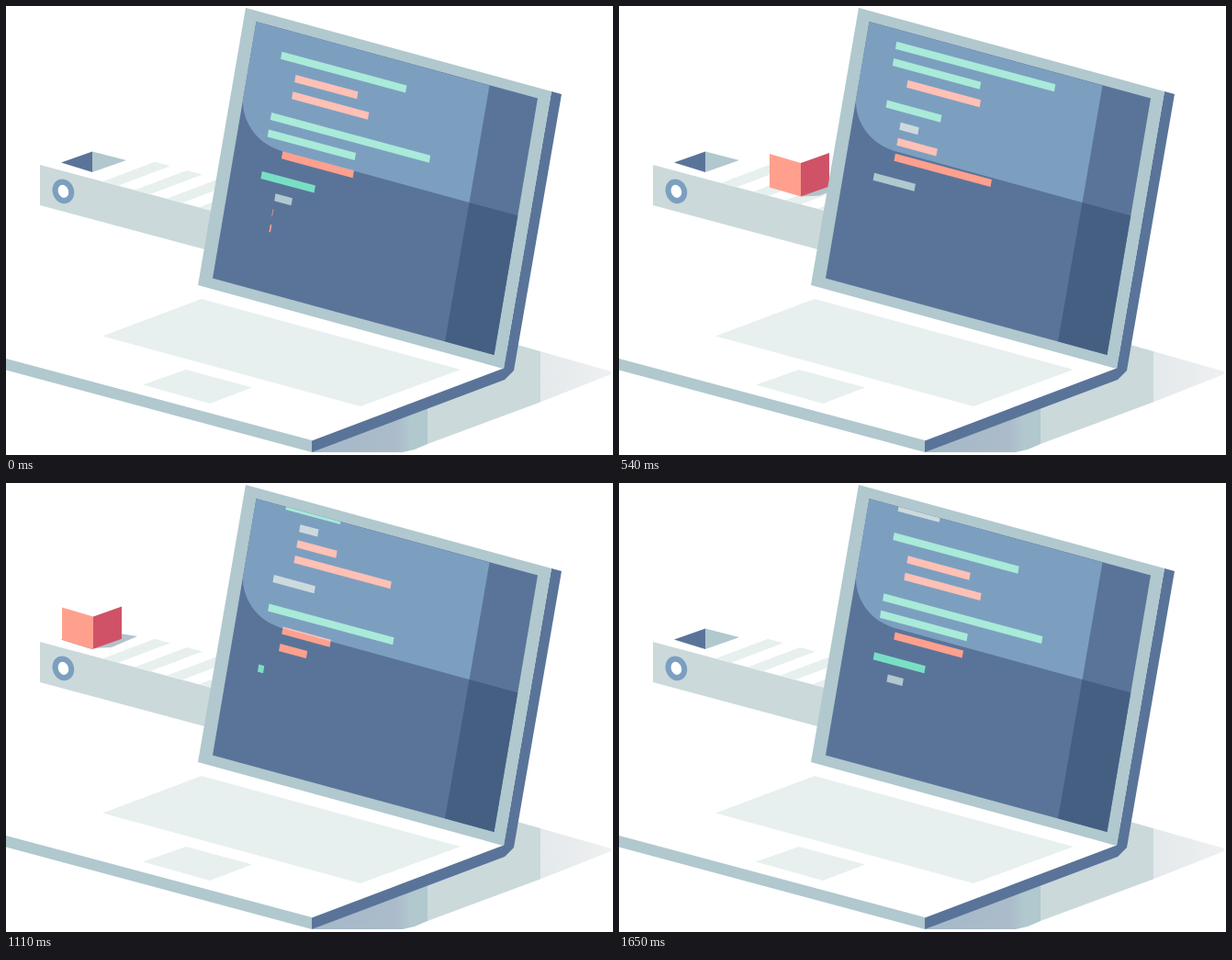
Recreate the animation shown at these times as an HTML page with a canvas. Size 661 by 489 pixels, loop 1680 ms.

```html
<!DOCTYPE html>
<html lang="en">
<head>
<meta charset="utf-8">
<title>Laptop and conveyor</title>
<style>
html, body { margin: 0; width: 100%; height: 100%; overflow: hidden; background: #fff; }
canvas { display: block; }
</style>
</head>
<body>
<canvas id="stage" width="661" height="489"></canvas>
<script>
const ctx = document.getElementById('stage').getContext('2d');
const LOOP = 1680, STEP = 30;

const WHITE = '#fff', PALE = '#e7f0ee', MIST = '#cbd9db', STEEL = '#b0c8ce';
const BLUE = '#5a7499', SKY = '#7c9fc0', NAVY = '#455f83';
const CORAL = '#ffa08e', ROSE = '#d05267', SHADE = '#b4c2cb';

// Bar colours: [in the dark area, under the highlight]
const TEAL = ['#79dfc4', '#a9ead9'];
const PINK = [CORAL, '#ffc0b5'];
const GREY = [STEEL, '#cddadd'];

const SCROLL = 240.6, GROW = 460, BAR = 8;
// Code bars: column, row, length, colours, time at which typing starts
const bars = [
  [32.5, 264.6, 136, TEAL, 624],
  [51, 284.8, 68, PINK, 797],
  [51, 303.2, 83, PINK, 922],
  [32.5, 330.8, 173, TEAL, 1055],
  [32.5, 349.2, 95, TEAL, 1210],
  [51, 368, 79.5, PINK, 1265],
  [33, 394.6, 59.5, TEAL, 1265],
  [51, 414, 20, GREY, 1305],
  [51, 431, 43, PINK, 1644],
  [51, 447.8, 105, PINK, 1644],
  [32.5, 473.8, 45, GREY, 1775]
];

// Distance travelled by the belt, and distance left for the crate: [time, px]
const beltKeys = [[0, 0], [240, 12], [420, 35], [660, 93], [900, 130.5], [1080, 140]];
const crateKeys = [[140, 175], [240, 169], [420, 138.5], [660, 66.5], [900, 14], [1080, 1], [1110, 0]];
const FALL_START = 1065, FALL_TIME = 450, FALL_DEPTH = 82, CRATE_H = 36.5;

function ease(u) {
  u = Math.min(1, Math.max(0, u));
  return (1 - Math.cos(Math.PI * u)) / 2;
}

// Smooth curve through keys, at rest at both ends
function glide(keys, t) {
  const last = keys.length - 1;
  if (t <= keys[0][0]) return keys[0][1];
  if (t >= keys[last][0]) return keys[last][1];
  let i = 0;
  while (t > keys[i + 1][0]) i++;
  const slope = j => j === 0 || j === last ? 0 :
    (keys[j + 1][1] - keys[j - 1][1]) / (keys[j + 1][0] - keys[j - 1][0]);
  const [t0, a] = keys[i], [t1, b] = keys[i + 1];
  const d = t1 - t0, u = (t - t0) / d, v = 1 - u;
  return a * (1 + 2 * u) * v * v + b * (3 - 2 * u) * u * u +
    d * u * v * (slope(i) * v - slope(i + 1) * u);
}

function trace(...p) {
  ctx.beginPath();
  for (let i = 0; i < p.length; i += 2) ctx.lineTo(p[i], p[i + 1]);
  ctx.closePath();
}

function poly(color, ...p) {
  trace(...p);
  ctx.fillStyle = color;
  ctx.fill();
}

function clipped(outline, draw) {
  ctx.save();
  outline();
  ctx.clip();
  draw();
  ctx.restore();
}

function ellipse(color, rx, ry) {
  ctx.beginPath();
  ctx.ellipse(62.4, 201.8, rx, ry, -0.35, 0, Math.PI * 2);
  ctx.fillStyle = color;
  ctx.fill();
}

function drawGroundShadow() {
  const g = ctx.createLinearGradient(333, 0, 661, 0);
  const at = (x, c) => g.addColorStop((x - 333) / 328, c);
  at(333, '#a5b9c8');
  at(425, '#abbbca');
  at(440, STEEL);
  at(459, STEEL);
  at(459, MIST);
  at(582, MIST);
  at(582, '#e4e9eb');
  at(661, '#eff0f1');
  poly(g, 333, 486, 540, 380, 557, 369, 659, 398, 659, 401, 583, 431, 459, 477, 445, 483, 432, 486);
}

function drawTray(t) {
  poly(MIST, 37, 173, 226, 223.5, 218, 265.5, 37, 217);
  ellipse(SKY, 11.6, 13.6);
  ellipse(WHITE, 5.6, 7.2);
  const shift = glide(beltKeys, t) % 35;
  clipped(() => trace(104, 191, 161.5, 169, 240, 190, 240, 228), () => {
    for (let k = 0; k < 6; k++) {
      const x = 105 + k * 35 - shift, y = 173 + (x - 37) * 0.267;
      poly(PALE, x, y, x + 57, y - 21.5, x + 74, y - 17, x + 17, y + 4.5);
    }
  });
  poly(BLUE, 60, 170.5, 94, 158.5, 94, 181);
  poly(STEEL, 94, 158.5, 131, 168, 94, 181);
}

function drawCrate(t) {
  const left = glide(crateKeys, t);
  const fall = FALL_DEPTH * ease((t - FALL_START) / FALL_TIME);
  const dx = left, dy = left * 0.266;
  const shade = Math.max(0, 1 - fall / CRATE_H);
  const fx = 95 + dx, fy = 180 + dy, rx = 126 + dx, ry = 169 + dy;
  if (shade > 0) {
    poly(SHADE, fx, fy, fx + 21 * shade, fy - shade, rx + 18 * shade, ry - 2 * shade, rx, ry - 5 * shade);
  }
  const body = () => {
    const lx = 61 + dx, bx = 92 + dx;
    const base = fall + dy, top = base - CRATE_H;
    poly(WHITE, lx, 170 + top, fx, 180 + top, rx, 169 + top, bx, 159 + top);
    poly(CORAL, lx, 170 + top, fx, 180 + top, fx, 180 + base, lx, 170 + base);
    poly(ROSE, fx, 180 + top, rx, 169 + top, rx, 169 + base, fx, 180 + base);
  };
  if (fall > 0) clipped(() => trace(60, 0, 60, 170.5, 94, 181, 131, 168, 131, 0), body);
  else body();
}

function drawBase() {
  poly(WHITE, 209, 304, 542, 395, 333, 473, 0, 384, 0, 360);
  poly(STEEL, 0, 384, 333, 473, 333, 486, 0, 396.5);
  poly(BLUE, 333, 473.5, 542, 394.5, 594, 93, 605, 96, 553, 397, 543, 407, 333, 486);
  poly(PALE, 213, 319, 495, 396, 386, 436, 105, 359.5);
  poly(PALE, 196, 396, 268, 415.5, 222, 433, 149, 412.5);
}

function drawBars(t, tone) {
  ctx.save();
  ctx.transform(1, 0.27, -0.17, 1, 272, 17);
  for (const [col, row, len, colors, start] of bars) {
    for (let lap = 0; lap < 2; lap++) {
      const now = t + lap * LOOP;
      const y = row - SCROLL * now / LOOP;
      const w = len * ease((now - start) / GROW);
      if (w < 0.3 || y < -BAR) continue;
      ctx.fillStyle = colors[tone];
      ctx.fillRect(col, y, w, BAR);
    }
  }
  ctx.restore();
}

function highlight() {
  ctx.beginPath();
  ctx.moveTo(272, 17);
  ctx.lineTo(526.5, 86.5);
  ctx.lineTo(504.5, 214);
  ctx.lineTo(304, 159);
  ctx.bezierCurveTo(275, 152, 257, 128, 258, 101);
  ctx.closePath();
}

function drawScreen(t) {
  poly(STEEL, 261, 2, 594, 93, 542, 395, 209, 304);
  clipped(() => trace(272.5, 17, 579, 100.5, 531.5, 380, 225, 296.5), () => {
    ctx.fillStyle = BLUE;
    ctx.fillRect(200, 0, 400, 400);
    poly(NAVY, 504.5, 214, 560, 229, 532, 381, 478, 365.5);
    drawBars(t, 0);
    clipped(highlight, () => {
      ctx.fillStyle = SKY;
      ctx.fillRect(200, 0, 400, 400);
      drawBars(t, 1);
    });
  });
}

function frame() {
  const t = Math.floor(performance.now() % LOOP / STEP) * STEP;
  ctx.fillStyle = WHITE;
  ctx.fillRect(0, 0, 661, 489);
  drawGroundShadow();
  drawTray(t);
  drawCrate(t);
  drawBase();
  drawScreen(t);
  requestAnimationFrame(frame);
}
frame();
</script>
</body>
</html>
```
